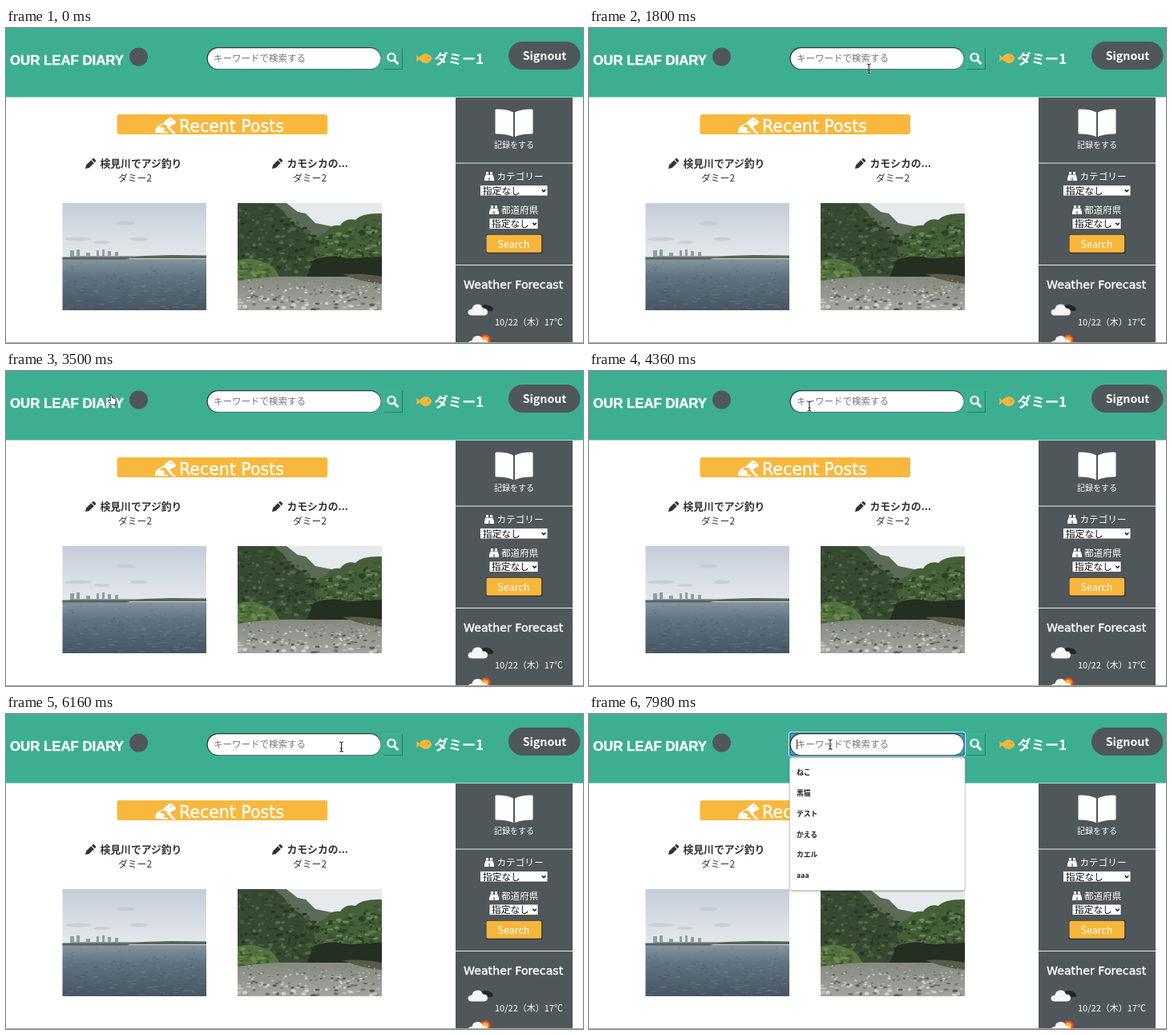
Write an HTML page that moves like this. It is 720x394 px and loops after 8000 ms.

```html
<!DOCTYPE html>
<html lang="ja">
<head>
<meta charset="utf-8">
<style>
html, body { margin: 0; width: 100%; height: 100%; overflow: hidden; background: #fff; }
svg { display: block; width: 100vw; height: 100vh; font-family: "Noto Sans CJK JP", "Noto Sans CJK", sans-serif; }
.hand { font-family: "DejaVu Sans", sans-serif; stroke: #fff; stroke-width: .4; }
.title { font-family: "Liberation Sans", Arial, sans-serif; stroke: #fff; stroke-width: .4; }
.mid { text-anchor: middle; }
.white { fill: #fff; }
.bold { font-weight: 700; }
.post { fill: #333; }
</style>
</head>
<body>
<svg viewBox="0 0 720 394" xmlns="http://www.w3.org/2000/svg">
  <defs>
    <linearGradient id="sky" x2="0" y2="1"><stop stop-color="#c3ccd8"/><stop offset=".5" stop-color="#d6dce4"/><stop offset="1" stop-color="#e6e8eb"/></linearGradient>
    <linearGradient id="sea" x2="0" y2="1"><stop stop-color="#8494a0"/><stop offset=".35" stop-color="#607280"/><stop offset="1" stop-color="#465663"/></linearGradient>
    <linearGradient id="river" x2="0" y2="1"><stop stop-color="#85897f"/><stop offset="1" stop-color="#a3a5a0"/></linearGradient>
    <clipPath id="seaClip"><path d="M70.500 219h179.500v134H70.500z"/></clipPath>
    <clipPath id="woodClip"><path d="M289 219h180v134H289z"/></clipPath>
    <path id="pencil" d="M0 13l1-4.500L7.200 2.300l3.600 3.600L4.600 12zM8 1.500L9.300.3q.8-.6 1.600 0l2 2q.6.8 0 1.600l-1.300 1.300z" fill="#333"/>
    <g id="binoculars" fill="#fff"><path d="M2 0h3v3H2zM7 0h3v3H7zM1.500 3.500H5.400V11H0V8zM6.600 3.500h3.900L12 8v3H6.600z"/><path d="M5 4h2v3H5z"/></g>
    <path id="chevron" d="M-2.300-1.200L0 1.200 2.300-1.200" fill="none" stroke="#111" stroke-width="1.500"/>
    <path id="cloud" d="M5 15q-5 0-5-4 0-3.500 5-4 1-6 7-6 5 0 6.500 5 6 0 6 4.500 0 4.500-5 4.500z" fill="#f6f6f6"/>
    <filter id="shadow"><feDropShadow dx="0" dy="1" stdDeviation="1.200" flood-opacity=".3"/></filter>
  </defs>

  <!-- header -->
  <path d="M0 0h720v86.500H0z" fill="#3dae92"/>
  <text x="5" y="45.500" font-size="16.800" class="white bold title">OUR LEAF DIARY</text>
  <circle cx="165.500" cy="36" r="11.500" fill="#50575b"/>
  <g id="focusRing" fill="none"><rect x="249.500" y="22.800" width="220" height="30" rx="2" stroke="#fff"/><rect x="250.700" y="24" width="217.600" height="27.600" rx="2" stroke="#2a63c0" stroke-width="1.600"/></g>
  <rect x="250.500" y="24" width="217.500" height="28" rx="14" fill="#2c3c38"/>
  <rect x="251.800" y="25.300" width="215.700" height="26" rx="13" class="white"/>
  <text x="259" y="42" font-size="11.500" fill="#757575">キーワードで検索する</text>
  <path id="caret" d="M259.500 32v12" stroke="#222"/>
  <path d="M471.500 52V25.500H495" fill="none" stroke="#48b59a"/>
  <path d="M471 51.500h23.500V25" fill="none" stroke="#2b7d69" stroke-width="1.200"/>
  <g fill="none" stroke="#fff" stroke-width="2.300"><circle cx="481" cy="36.500" r="4.600"/><path d="M484.300 40l5 5" stroke-width="2.800"/></g>
  <path d="M512 33.500q1.500 2 4 3 3.500-4.500 8-4.500 5 0 7.500 6-2.500 6-7.500 6-4.500 0-8-4.500-2.500 1-4 3 1-4.500 0-9z" fill="#f6b53c"/>
  <circle cx="527" cy="37" r=".9" fill="#3dae92"/>
  <text x="534.500" y="44.500" font-size="17.200" class="white bold">ダミー1</text>
  <rect x="627" y="17" width="89.500" height="35" rx="17.500" fill="#50575b"/>
  <text x="672" y="39.800" font-size="14.200" class="white bold mid">Signout</text>

  <!-- posts -->
  <rect x="138.500" y="108" width="262.500" height="25" rx="3" fill="#f8b83e"/>
  <path class="white" d="M186 131q-.5-7 6-10 5-2 8-6 2.500-1.500 3-2 1.500-2 4-.5l1.500 2q3 1 3.500 3.500 0 2-3.500 3l-4 2.500 5 6.500q2 0 2 2h-3.500l-6.500-7q-1-4-5-4.500-4 0-4.500 4 3-2 5.500 1 1 2.500-1.500 4h4q2 0 2 2z"/>
  <circle cx="206" cy="115.500" r="1" fill="#f8b83e"/>
  <text x="216" y="130" font-size="20.500" class="white hand">Recent Posts</text>
  <use href="#pencil" x="99" y="163"/><use href="#pencil" x="332" y="163"/>
  <g class="post"><g font-size="12.800" class="bold">
    <text x="117.500" y="174">検見川でアジ釣り</text><text x="350.500" y="174">カモシカの...</text></g>
    <g font-size="11.800" class="mid"><text x="161" y="192">ダミー2</text><text x="379" y="192">ダミー2</text></g>
  </g>

  <g clip-path="url(#seaClip)">
    <path d="M70 219h180v71H70z" fill="url(#sky)"/>
    <g fill="#b3bdc8" opacity=".45"><ellipse cx="90" cy="264" rx="17" ry="2.500"/><ellipse cx="120" cy="268" rx="10" ry="2"/><ellipse cx="166" cy="264" rx="11" ry="2.500"/><ellipse cx="149" cy="244" rx="12" ry="2.500"/></g>
    <path d="M70 287h10v-9h5v7h3v-8h4v8h8v-4h5v4h8v-7h3v7h4v-8h3v8h4v-6h4v6h5v-5h4v5h30v4H70z" fill="#909ca4"/>
    <path d="M70 286.500h90l12-1.500 34-1 44 .5v6H70z" fill="#56645c"/>
    <path d="M155 288h95v1.500H150z" fill="#d0ccbe"/>
    <path d="M70 289.500h180V353H70z" fill="url(#sea)"/>
    <g id="waves" fill="none"></g>
  </g>

  <g clip-path="url(#woodClip)">
    <path d="M289 219h180v134H289z" fill="#e6eaed"/>
    <path d="M289 219h61l14 11 10 2 12 12 20 4 63 4v64H289z" fill="#5b6b57"/>
    <path d="M289 219h45l12 10 10 14 14 8 16 12 16 10v40H289z" fill="#364a31"/>
    <path d="M384 272q2-13 15-16 6-11 18-9 7-10 19-7 8-9 33-8v82h-78z" fill="#456039"/>
    <g id="leaves"></g>
    <path d="M384 290q20-8 44-2l41-2v28H374z" fill="#242e21"/>
    <path d="M289 291q18-6 32 2 14 2 22 22H289z" fill="#55743f"/>
    <g id="bushes"></g>
    <path d="M289 316q40-6 80-5l100 0v42H289z" fill="url(#river)"/>
    <path d="M420 308q25-2 49 3v9q-25-2-49-12z" fill="#575c49"/>
    <g id="stones"></g>
  </g>

  <!-- sidebar -->
  <path d="M561 87h146v307H561z" fill="#50575b"/>
  <path d="M561 169h146M561 296.500h146" stroke="#e8eaea"/>
  <path class="white" d="M610.500 103q0-1.500 1.500-1.500 14 0 21 4v30.500q-9-4-21-3.500-1.500 0-1.500-1.500zM657.500 103q0-1.500-1.500-1.500-14 0-21 4v30.500q9-4 21-3.500 1.500 0 1.500-1.500z"/>
  <text x="634" y="150" font-size="10" class="white mid">記録をする</text>
  <use href="#binoculars" x="597" y="180"/><use href="#binoculars" x="603" y="222"/>
  <g font-size="11.600" class="white"><text x="612.500" y="190">カテゴリー</text><text x="618" y="232">都道府県</text></g>
  <g fill="#fff" stroke="#444" stroke-width=".8"><rect x="591.500" y="196.500" width="84.500" height="13.500" rx="1"/><rect x="603" y="238" width="61" height="13.500" rx="1"/></g>
  <g font-size="11.700" fill="#111"><text x="595" y="207.500">指定なし</text><text x="606" y="249">指定なし</text></g>
  <use href="#chevron" x="671" y="203.500"/><use href="#chevron" x="659.500" y="245"/>
  <rect x="599" y="258" width="70.500" height="24" rx="2" fill="#30302c"/>
  <rect x="599.500" y="258.700" width="68.700" height="22" rx="2" fill="#f7b63c"/>
  <text x="633.500" y="274.500" font-size="12.500" class="white mid">Search</text>
  <text x="571" y="326" font-size="14.200" class="white hand">Weather Forecast</text>
  <path d="M591 352q2-7 8-6 8 1 9 6 0 2-4 2h-10z" fill="#22272a"/>
  <use href="#cloud" x="576.500" y="344.500"/>
  <text x="610" y="372" font-size="11" class="white">10/22（木）17℃</text>
  <circle cx="598" cy="390" r="6.500" fill="#ef4d2c"/><circle cx="598" cy="390" r="4" fill="#ffb52e"/>
  <use href="#cloud" x="576.500" y="384"/>
  <path d="M0 393.500h720" stroke="#a4a7a8"/>

  <g id="suggestions">
    <rect x="250.500" y="54.500" width="218.500" height="166" rx="3" fill="#fff" stroke="#c8c8c8" stroke-width=".8" filter="url(#shadow)"/>
    <g id="items" font-size="8.800" fill="#222" class="bold"></g>
  </g>

  <g id="cursor" stroke-linejoin="round">
    <g id="ibeam" fill="none"><path d="M-2.500-6Q0-6 0-4.500 0-6 2.500-6M0-4.500v9M-2.500 6Q0 6 0 4.500 0 6 2.500 6" stroke="#fff" stroke-width="2.600" opacity=".75"/><path d="M-2.500-6Q0-6 0-4.500 0-6 2.500-6M0-4.500v9M-2.500 6Q0 6 0 4.500 0 6 2.500 6M-1.500 2h3" stroke="#222" stroke-width="1.100"/></g>
    <path id="pointer" d="M-2-5q1.300-1.500 2 0l.5 3 4 1q1 .5.800 2L4.500 6.500H-1L-4.500 1.500q.2-1.500 1.500-.8l1.500 1.200z" fill="#fff" stroke="#222" stroke-width=".9"/>
    <path id="arrow" d="M0 0v11l2.600-2.400L4.300 12.500l1.800-.8-1.700-3.700H8z" fill="#222" stroke="#fff" stroke-width=".9"/>
  </g>
</svg>
<script>
const LOOP = 8000, OPEN_AT = 7700;
const $ = id => document.getElementById(id);
const show = (id, on) => $(id).setAttribute('visibility', on ? 'visible' : 'hidden');

let seed = 7;
const random = (lo, hi) => {
  seed = seed * 16807 % 2147483647;
  return lo + (hi - lo) * seed / 2147483647;
};
const pick = list => list[Math.floor(random(0, list.length))];
const repeat = (count, make) => Array.from({ length: count }, (_, i) => make(i)).join('');
const blob = (x, y, rx, ry, fill) => `<ellipse cx="${x}" cy="${y}" rx="${rx}" ry="${ry}" fill="${fill}"/>`;
const foliage = (count, x0, x1, top, bottom, colors) => repeat(count, () => {
  const x = random(x0, x1);
  return blob(x, random(top(x), bottom), random(1, 4), random(.8, 2.5), pick(colors));
});

// soft surface detail in the two pictures
$('waves').innerHTML = repeat(170, () => {
  const y = random(292, 353), w = (y - 285) / 9;
  return `<path d="M${random(68, 248)} ${y}q${w / 2} 1 ${w} 0" stroke="${pick(['#3a4a58', '#8292a0'])}" stroke-width=".8" opacity=".5"/>`;
});
$('leaves').innerHTML =
  foliage(190, 290, 392, x => 222 + Math.max(0, x - 335) * .75, 306, ['#273822', '#43593b', '#55694a', '#2f4429']) +
  foliage(190, 394, 468, x => 262 - (x - 394) * .32, 304, ['#2c4026', '#587548', '#6c875a', '#3b5331']);
$('bushes').innerHTML = foliage(40, 290, 332, x => 292, 315, ['#3d5a30', '#6d8c50', '#4a683a']);
$('stones').innerHTML = repeat(190, () => {
  const y = random(313, 352), size = (y - 302) / 13;
  return blob(random(290, 468), y, random(.6, 1) * size, random(.3, .6) * size, pick(['#d0d1cc', '#74786e', '#5a5f55', '#bdbdb4']));
});
$('items').innerHTML = ['ねこ', '黒猫', 'テスト', 'かえる', 'カエル', 'aaa']
  .map((word, i) => `<text x="259" y="${75.8 + i * 25.9}">${word}</text>`).join('');

// cursor stops: time, x, y
const path = [
  [500, 440, 400], [820, 415, 230], [1200, 370, 80], [1560, 350, 51], [1900, 349, 51],
  [2400, 262, 46], [2640, 195, 29], [2900, 120, 36], [3240, 90, 38], [3700, 160, 34],
  [4080, 240, 43], [4360, 275, 44], [4700, 370, 41], [5100, 475, 38], [5340, 487, 37],
  [5600, 535, 40], [5900, 515, 41], [6250, 400, 41], [6650, 310, 39], [7020, 301, 38], [8001, 301, 38]
];

function cursorAt(t) {
  const i = path.findIndex(stop => stop[0] > t);
  if (i < 1) return null;
  const [t0, x0, y0] = path[i - 1], [t1, x1, y1] = path[i];
  const p = (t - t0) / (t1 - t0), e = p * p * (3 - 2 * p);
  return [x0 + (x1 - x0) * e, y0 + (y1 - y0) * e];
}

function cursorShape(x, y) {
  if (y > 58) return 'arrow';
  if (x > 250 && x < 469) return 'ibeam';
  return x < 205 || (x > 470 && x < 496) || (x > 510 && x < 600) ? 'pointer' : 'arrow';
}

function draw(now) {
  const t = now % LOOP, pos = cursorAt(t);
  for (const id of ['focusRing', 'caret', 'suggestions']) show(id, t >= OPEN_AT);
  const shape = pos && cursorShape(...pos);
  for (const id of ['ibeam', 'pointer', 'arrow']) show(id, id === shape);
  if (pos) $('cursor').setAttribute('transform', `translate(${pos})`);
  requestAnimationFrame(draw);
}
draw(0);
</script>
</body>
</html>
```
